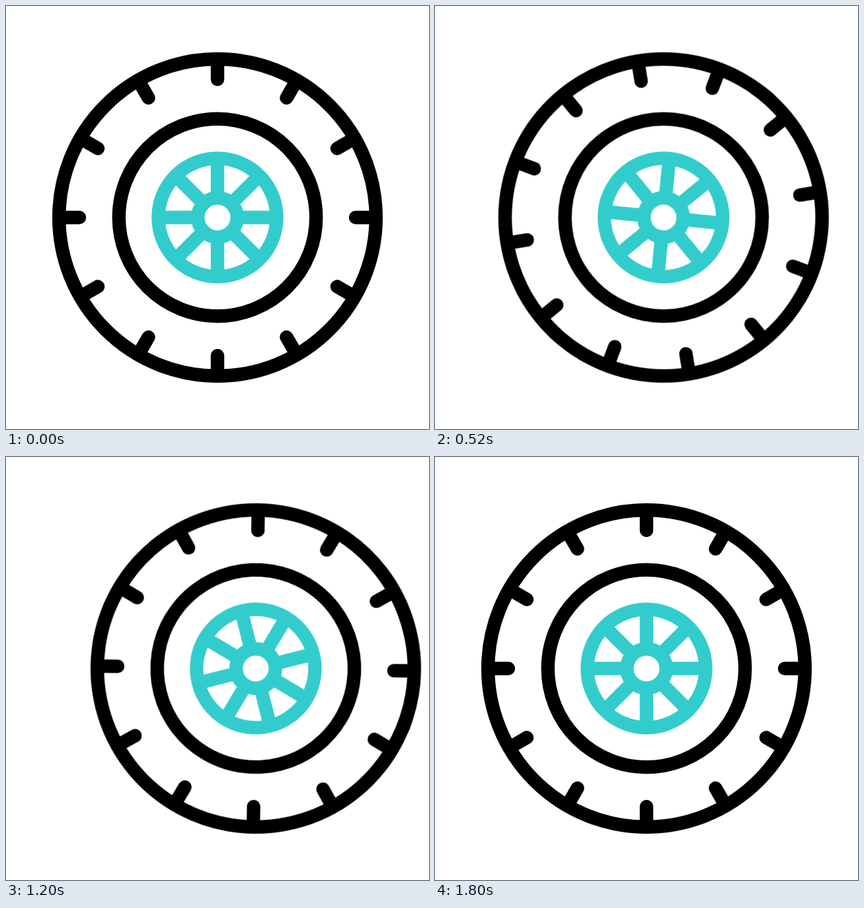
Animation, 640 px wide and 640 px high, one loop 2000 ms. Source, as an HTML page without scripts:

```html
<!DOCTYPE html>
<html lang="en">
<head>
<meta charset="utf-8">
<title>Rolling wheel</title>
<style>
  html, body {
    margin: 0;
    width: 100%;
    height: 100%;
    overflow: hidden;
    background: #fff;
  }
  svg {
    display: block;
    width: 100%;
    height: 100%;
  }
  .wheel {
    fill: none;
    stroke-width: 20.4;
    transform-origin: 0 0;
    animation: roll 2s cubic-bezier(.333, 0, .667, 1) infinite;
  }
  .tyre { stroke: #000; stroke-linecap: round; }
  .rim { stroke: #3cc; }

  /* roll out, drift back, then snap to rest */
  @keyframes roll {
    0%, 4%    { transform: translateX(0) rotate(0deg); }
    54%       { transform: translateX(62.6px) rotate(123deg); }
    89.99%    { transform: translateX(0) rotate(95deg); }
    90%, 100% { transform: translateX(0) rotate(0deg); }
  }
</style>
</head>
<body>
<svg viewBox="0 0 640 640">
  <defs>
    <path id="tread" d="M0-209V-232M0 209V232"/>
    <path id="spoke" d="M0-34V-86M0 34V86"/>
  </defs>
  <g transform="translate(320 320)">
    <g class="wheel">
      <g class="tyre">
        <circle r="239.8"/>
        <circle r="149.2"/>
        <use href="#tread"/>
        <use href="#tread" transform="rotate(30)"/>
        <use href="#tread" transform="rotate(60)"/>
        <use href="#tread" transform="rotate(90)"/>
        <use href="#tread" transform="rotate(120)"/>
        <use href="#tread" transform="rotate(150)"/>
      </g>
      <g class="rim">
        <circle r="89.6"/>
        <circle r="29.8"/>
        <use href="#spoke"/>
        <use href="#spoke" transform="rotate(45)"/>
        <use href="#spoke" transform="rotate(90)"/>
        <use href="#spoke" transform="rotate(135)"/>
      </g>
    </g>
  </g>
</svg>
</body>
</html>
```
